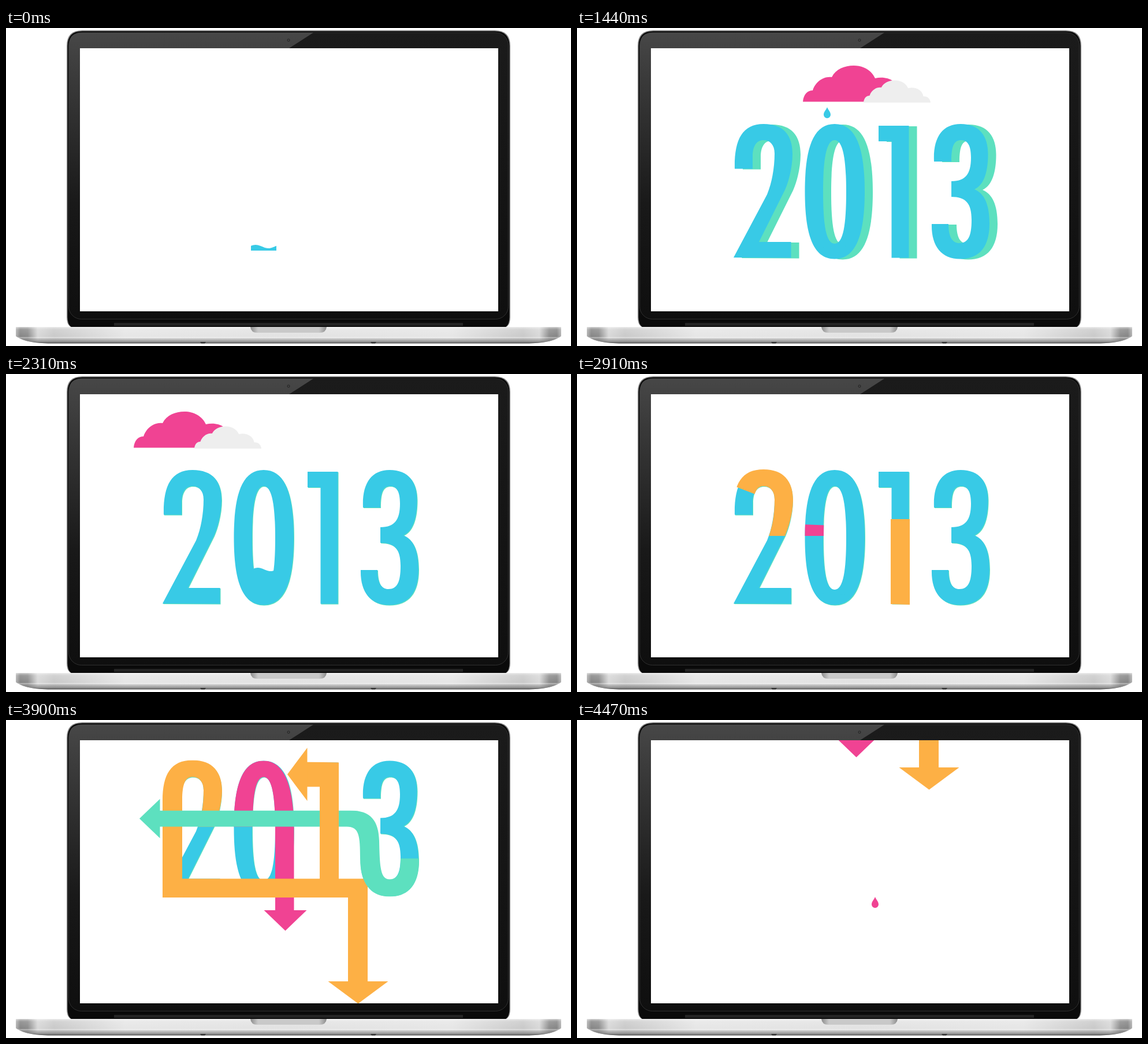
An HTML page that plays this animation: 978 px wide and 550 px high, repeating every 4.5 s.

```html
<!DOCTYPE html>
<html lang="en">
<head>
<meta charset="utf-8">
<title>2013</title>
<style>
html, body { margin: 0; width: 100%; height: 100%; overflow: hidden; background: #fff; }
svg { display: block; width: 978px; height: 550px; }
.blue { fill: #38cae6; }
.green { fill: #5de0bf; stroke: #5de0bf; }
.pink { fill: #f04393; stroke: #f04393; }
.orange { fill: #fdb045; stroke: #fdb045; }
.band { fill: none; stroke-width: 46; }
.head, .flat { stroke: none; }
</style>
</head>
<body>
<svg viewBox="0 0 978 550">
  <defs>
    <linearGradient id="bezel" x2="0" y2="1">
      <stop offset="0" stop-color="#1b1b1b"/><stop offset="1" stop-color="#0f0f0f"/>
    </linearGradient>
    <linearGradient id="gloss" x2="0" y2="1">
      <stop offset="0" stop-color="#474747"/><stop offset=".15" stop-color="#3b3b3b"/>
      <stop offset=".6" stop-color="#191919"/><stop offset="1" stop-color="#111" stop-opacity="0"/>
    </linearGradient>
    <linearGradient id="metal">
      <stop offset="0" stop-color="#b5b5b5"/><stop offset=".008" stop-color="#858585"/>
      <stop offset=".022" stop-color="#8c8c8c"/><stop offset=".04" stop-color="#d8d8d8"/>
      <stop offset=".07" stop-color="#c9c9c9"/><stop offset=".2" stop-color="#e6e6e6"/>
      <stop offset=".5" stop-color="#e2e2e2"/><stop offset=".8" stop-color="#e6e6e6"/>
      <stop offset=".93" stop-color="#c9c9c9"/><stop offset=".96" stop-color="#d8d8d8"/>
      <stop offset=".978" stop-color="#8c8c8c"/><stop offset=".992" stop-color="#858585"/>
      <stop offset="1" stop-color="#b5b5b5"/>
    </linearGradient>
    <linearGradient id="shade" x2="0" y2="1">
      <stop offset="0" stop-color="#fff" stop-opacity=".5"/><stop offset=".15" stop-color="#fff" stop-opacity=".15"/>
      <stop offset=".58" stop-color="#fff" stop-opacity="0"/><stop offset=".64" stop-color="#fff" stop-opacity=".4"/>
      <stop offset=".72" stop-color="#999" stop-opacity=".4"/><stop offset=".9" stop-color="#777" stop-opacity=".75"/>
      <stop offset="1" stop-color="#3a3a3a" stop-opacity=".9"/>
    </linearGradient>
    <linearGradient id="lip">
      <stop offset="0" stop-color="#8c8c8c"/><stop offset=".1" stop-color="#c9c9c9"/>
      <stop offset=".9" stop-color="#c9c9c9"/><stop offset="1" stop-color="#8c8c8c"/>
    </linearGradient>

    <path id="lid" d="M112 517Q105 513 105 500V31Q105 4 132 4H846Q873 4 873 31V500Q873 513 866 517Z"/>
    <path id="base" d="M17 517.500H961V533C950 541 930 545.500 900 545.500H78C48 545.500 28 541 17 533Z"/>
    <clipPath id="lidClip"><use href="#lid"/></clipPath>
    <clipPath id="screen"><rect x="128" y="35" width="724" height="455"/></clipPath>

    <g id="digits" fill-rule="evenodd">
      <path d="M271 397L329 288C338 266 342 240 342 217C342 202 334 194 323 194C311 194 304 204 304 222V243.500H273C272 195 285 166 323 166C358 166 373 186 373 218C373 240 367 264 360 280L315 370H370.500V397.500Z"/>
      <path d="M446 166C485 166 498 212 498 283C498 353 485 399.500 446 399.500C407 399.500 394.500 353 394.500 283C394.500 212 407 166 446 166ZM446 194C461 194 466 230 466 283C466 340 461 373 446 373C431 373 426 340 426 283C426 230 431 194 446 194Z"/>
      <path d="M522 169H574.500V397.500H544.500V196H522Z"/>
      <path d="M618 231C616 190 632 166 664 166C697 166 711.500 187 711.500 218C711.500 252 703 272 688 279C705 286 714 305 714 338C714 378 697 399.500 663 399.500C630 399.500 613 376 614 339H643C643 362 650 372 662 372C677 372 683 360 683 332C683 303 673 292 648 292V265C673 265 682 252 682 224C682 203 676 194 665 194C653 194 648 203 648 231Z"/>
    </g>
    <path id="cloud" d="M0 62.500C1 50 8 43 17 43C21 30 34 18 50 20C57 6 72 0 88 0C104 0 119 8 125 22C144 17 165 26 168 45C180 44 187 52 188 62.500Z"/>
    <path id="drop" d="M0 0C2 5 6 8 6 13A6 6 0 0 1-6 13C-6 8-2 5 0 0Z"/>

    <clipPath id="twoClip"><path d="M271 402.500V235C271 190 285 165 323 165C358 165 374 186 374 218C374 240 367 263 360 280H332C339 262 342 240 342 217C342 202 334 194 323 194C311 194 305 204 305 235V370H626V552H592V402.500Z"/></clipPath>
    <clipPath id="zeroClip"><path d="M394.500 280C394.500 214 407 166 446 166C483 166 498.500 214 498.500 283V428H466V283C466 230 461 194 446 194C431 194 427 230 427 280Z"/></clipPath>
    <clipPath id="oneClip"><path d="M543 398L576 399V169L520 168V211H543Z"/></clipPath>
    <clipPath id="threeClip"><path d="M715 335C715 380 697 401 664 401C630 401 613 376 613 335C613 295 611 280 590 280H262V252H596C632 252 645 270 646 305C647 350 648 371 664 371C678 371 683 360 683 335Z"/></clipPath>
  </defs>

  <!-- laptop -->
  <use href="#lid" fill="#8a8a8a"/>
  <path d="M113 517Q106.500 513 106.500 500V31Q106.500 5.500 132 5.500H846Q871.500 5.500 871.500 31V500Q871.500 513 865 517Z" fill="#0a0a0a"/>
  <rect x="108.500" y="8" width="761" height="495.500" rx="22" fill="url(#bezel)" stroke="#303030"/>
  <path d="M109 500V30Q109 8 131 8H532L490 35H128V500Z" fill="url(#gloss)" clip-path="url(#lidClip)"/>
  <circle cx="489" cy="21" r="2.500" fill="#2b2b2b"/><circle cx="489" cy="21" r="1" fill="#555"/>
  <rect x="187" y="510" width="604" height="5" fill="#242424"/>
  <rect x="128" y="35" width="724" height="455" fill="#fff"/>
  <use href="#base" fill="url(#metal)"/>
  <use href="#base" fill="url(#shade)"/>
  <path d="M423 517H555Q554 527 543 527H435Q424 527 423 517Z" fill="url(#lip)"/>
  <path d="M336 543H346L344 545.500H338ZM631 543H641L639 545.500H633Z" fill="#333"/>

  <g clip-path="url(#screen)">
    <g id="page">
      <g id="number">
        <use id="ghost" href="#digits" fill="#5de0bf"/>
        <use href="#digits" class="blue"/>
      </g>
      <path id="water" class="blue"/>
      <path id="drip" class="blue"/>
      <g id="zero" class="pink"></g>
      <circle id="bead" class="pink flat" cx="498" cy="289.500"/>
      <g id="two" class="orange"></g>
      <g id="three" class="green"></g>
      <g id="one" class="orange"></g>
    </g>
    <use id="rain" href="#drop" class="blue"/>
    <use id="leak" href="#drop" class="blue"/>
    <use id="spill" href="#drop" class="pink flat"/>
    <use id="cloudA" href="#cloud" fill="#f04393"/>
    <use id="cloudB" href="#cloud" fill="#eee"/>
  </g>
</svg>
<script>
const LOOP = 4500, STEP = 30;
const $ = id => document.getElementById(id);
const clamp = v => Math.max(0, Math.min(1, v));
const ramp = (t, a, b) => clamp((t - a) / (b - a));

// Linear interpolation through [time, value] pairs.
function track(t, keys) {
  if (t <= keys[0][0]) return keys[0][1];
  for (let i = 1; i < keys.length; i++) {
    const [t0, v0] = keys[i - 1], [t1, v1] = keys[i];
    if (t <= t1) return v0 + (v1 - v0) * (t - t0) / (t1 - t0);
  }
  return keys[keys.length - 1][1];
}

function place(id, x, y, shown = true, scale = 1) {
  const el = $(id);
  el.setAttribute('transform', `translate(${x} ${y}) scale(${scale})`);
  el.setAttribute('visibility', shown ? 'visible' : 'hidden');
}

// A band that grows along a path and ends in an arrowhead.
function ribbon(id, d, tip, half) {
  const ns = 'http://www.w3.org/2000/svg';
  const add = (parent, name, attrs) => {
    const el = parent.appendChild(document.createElementNS(ns, name));
    for (const k in attrs) el.setAttribute(k, attrs[k]);
    return el;
  };
  const box = add($(id), 'g', { 'clip-path': `url(#${id}Clip)` });
  const band = add(box, 'path', { d, class: 'band' });
  const head = add($(id), 'path', { d: `M-.5 ${-half}L${tip} 0L-.5 ${half}Z`, class: 'head' });
  const length = band.getTotalLength();
  return {
    length,
    draw(front, headScale) {
      const f = Math.max(0, Math.min(length, front));
      band.setAttribute('stroke-dasharray', `${f} ${length + 100}`);
      band.setAttribute('visibility', f > 0 ? 'visible' : 'hidden');
      const p = band.getPointAtLength(f), q = band.getPointAtLength(Math.max(0, f - 1));
      const angle = Math.atan2(p.y - q.y, p.x - q.x) * 180 / Math.PI;
      head.setAttribute('transform', `translate(${p.x} ${p.y}) rotate(${angle}) scale(${headScale})`);
      head.setAttribute('visibility', headScale > 0 ? 'visible' : 'hidden');
    }
  };
}

const two = ribbon('two', 'M345 284C355 250 358 222 353 208C347 185 335 180 323 180C300 180 288 200 288 235V386H609.500V548', 38, 52);
const zero = ribbon('zero', 'M411 282C411 215 420 180 446 180C472 180 483 215 483.500 283V425', 35, 37);
const one = ribbon('one', 'M559 400V189.500H521', 34, 46);
const three = ribbon('three', 'M699 334C699 370 690 386 664 386C635 386 631 360 630 320C629 280 620 266 592 266H266', 35, 34);

function grow(r, t, a, b) {
  const p = ramp(t, a, b);
  r.draw(p * r.length, ramp(p, .8, 1));
}

function drawWater(t) {
  const level = track(t, [[1680, 378], [2310, 338], [2400, 338], [2940, 381]]);
  let d = 'M424 385';
  for (let x = 424; x <= 468; x += 4)
    d += `L${x} ${level - 3 * Math.sin((x - 425) / 7 - (t - 2310) / 90)}`;
  $('water').setAttribute('d', d + 'V385Z');
}

function drawDrip(t) {
  const d = track(t, [[3090, 0], [3240, 1], [3450, 1], [3630, 0]]);
  const y = 399 + 32 * d, side = 402 + 2 * d;
  $('drip').setAttribute('visibility', d > 0 ? 'visible' : 'hidden');
  $('drip').setAttribute('d',
    `M402 345C${409 - 3 * d} 380 416 ${side - 4} 426 ${side}C435 ${side + 5 * d} 434 ${y} 446 ${y}` +
    `C458 ${y} 456 ${side + 8 * d} 463 ${side}L478 380L446 388L420 375Z`);
}

function draw(t) {
  $('number').setAttribute('opacity', ramp(t, 390, 570));
  const depth = Math.max(1, 28.500 - (t - 840) * 14.500 / 600);
  place('ghost', depth, 1);

  const cloud = track(t, [[420, 840], [600, 640], [840, 481], [1440, 391], [2010, 261], [2310, 221], [2400, 160], [2580, -95]]);
  const late = track(t, [[960, 852], [1200, 640], [1440, 496]]);
  place('cloudA', cloud, 65, t >= 420 && t < 2600);
  place('cloudB', t < 1440 ? late : cloud + 105, 90.500, t >= 960 && t < 2600, .617);

  const fall = (t - 1350) / 1000;
  place('rain', 433, 118 + 80 * fall + 1450 * fall * fall, fall >= 0 && t < 1710);
  drawWater(t);
  drawDrip(t);
  const leak = (t - 3240) / 1000;
  place('leak', 447.500, 415 + 1400 * leak * leak, leak >= 0 && t < 3540);

  grow(zero, t, 2880, 3420);
  grow(one, t, 2640, 3090);
  grow(three, t, 3000, 3420);
  const front = track(t, [[2610, 0], [3450, two.length - 377], [3870, two.length], [3900, two.length], [4470, two.length - 70]]);
  two.draw(front, ramp(front, two.length - 155, two.length - 110));
  $('bead').setAttribute('r', 6.500 * track(t, [[3360, 0], [3420, 1], [3480, 1], [3600, 0]]));

  const scroll = Math.max(0, 95.500 + (t - 3900) * 300 / 570);
  place('page', 0, -scroll);

  const u = (t - 4200) / 270;
  place('spill', 516, 175 + 131 * u * u, u >= 0, clamp(.4 + 2 * u));
}

const start = performance.now();
function tick() {
  const t = (performance.now() - start) % LOOP;
  draw(Math.floor(t / STEP) * STEP);
  requestAnimationFrame(tick);
}
tick();
</script>
</body>
</html>
```
